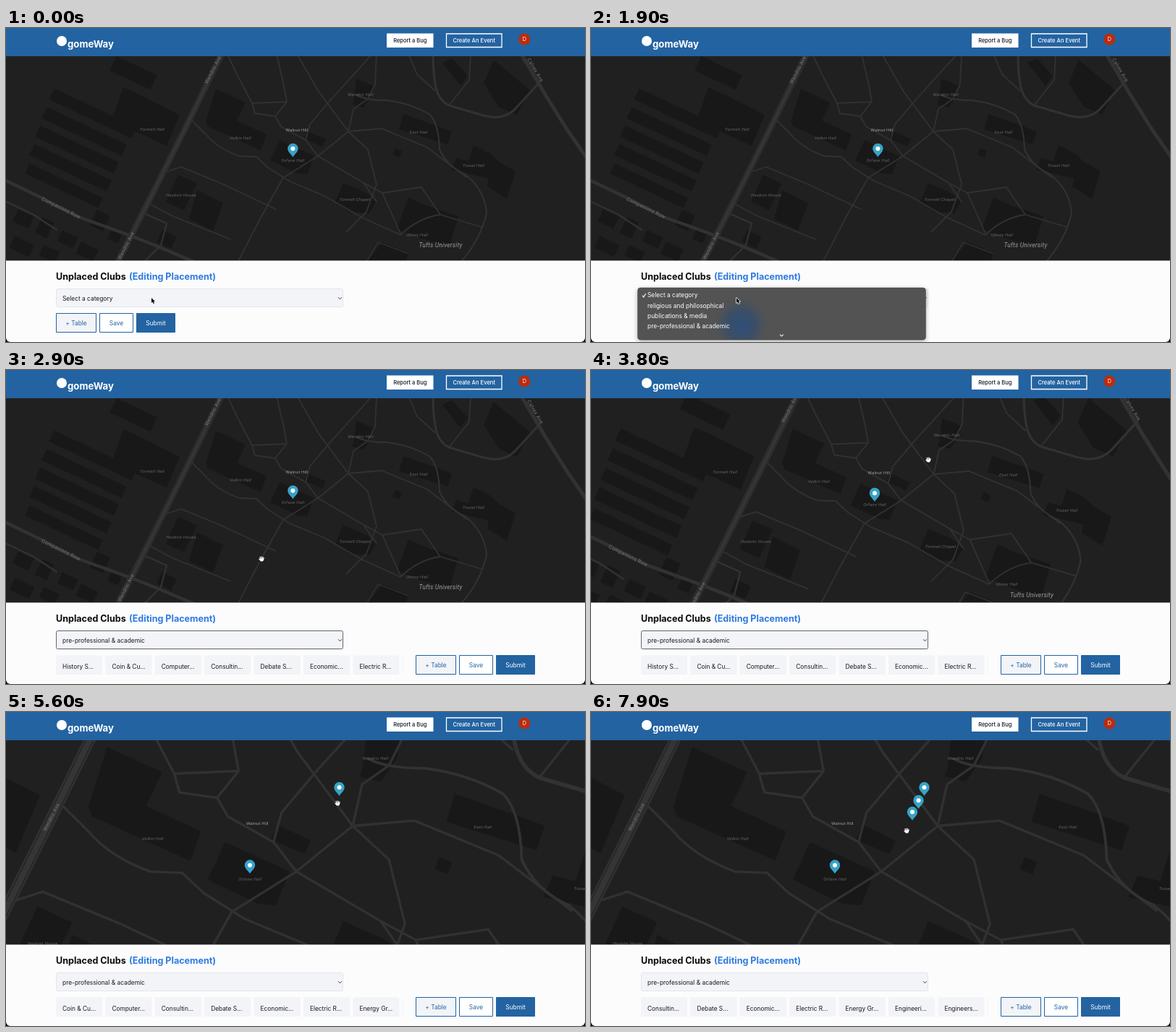
An HTML page with a canvas for the animation above (8000 ms loop, 800 by 434 pixels).

```html
<!DOCTYPE html>
<html lang="en">
<head>
<meta charset="utf-8">
<title>Club placement map</title>
<style>
html, body { margin: 0; width: 100%; height: 100%; overflow: hidden; background: #000; }
canvas { display: block; width: 800px; height: 434px; }
</style>
</head>
<body>
<canvas id="stage" width="800" height="434"></canvas>
<script>
const ctx = document.getElementById('stage').getContext('2d');
const LOOP = 8000, STEP = 100;
const BLUE = '#2363a1', PANEL = '#f2f4f8', TAU = Math.PI * 2;
const UI = 'Inter, sans-serif', MAP = 'Roboto, sans-serif';

const zoom = { x: 466, y: 126, from: 3700, to: 4700, max: 1.854 };
const menu = { open: 500, hover: 900, leave: 1500, close: 2300 };
const drops = [{ t: 5500, x: 460.5, y: 116 }, { t: 6600, x: 452.5, y: 134 }, { t: 7700, x: 444, y: 150 }];

// Cursor stops: time, x, y
const stops = [
  [0, 201, 373], [2300, 201, 373], [2900, 353, 261], [3500, 466, 124], [4700, 466, 124],
  [5000, 100, 408], [5100, 100, 408], [5500, 459, 124], [5600, 458, 126], [5700, 458, 126],
  [6050, 100, 408], [6200, 100, 408], [6600, 451, 141], [6750, 451, 141],
  [7100, 100, 408], [7300, 100, 408], [7700, 442, 157], [7900, 436, 164], [8000, 436, 164]
];

const options = ['Select a category', 'religious and philosophical', 'publications & media', 'pre-professional & academic'];
const clubs = ['History S...', 'Coin & Cu...', 'Computer...', 'Consultin...', 'Debate S...', 'Economic...',
  'Electric R...', 'Energy Gr...', 'Engineeri...', 'Engineers...', 'Finance S...'];

// Map geometry, in pixels at zoom 1
const mainRoad = 'M298 36L249 136L200 234L153 326';
const roads = [
  [4.5, 'M-4 209L50 235L100 261L172 287L205 300L262 324'],
  [5, 'M712 36L745 92L775 140L804 182'],
  [3, 'M590 36Q590 64 594 82Q598 100 612 107L660 121Q690 129 707 108L738 74'],
  [2.2, 'M-4 238L38 258L70 279M186 254L222 270L214 300L190 324'],
  [2, 'M485 93Q498 100 527 100Q559 104 585 119Q598 132 599 168Q610 192 634 202Q662 224 664 256Q656 292 628 324']
];
const walks = [
  'M257 128L276 147Q292 166 322 177L346 178L362 193L392 212L440 232L492 262L545 286',
  'M306 36L318 62L340 104L388 102L384 80L374 36M340 104L344 118L372 122L388 102',
  'M372 122L380 136L414 155L431 177L473 143L480 112L500 98L510 78L512 36',
  'M414 155L420 133L447 101L506 36M473 143L432 88L402 36M473 143L519 139L582 165',
  'M431 177L383 207L352 262L320 324M431 177L494 214L520 228L545 284',
  'M473 143L500 168L512 216L498 254L470 282M512 240L494 214',
  'M582 165L599 178L636 206M592 86L568 64L556 36M612 107L640 72L642 36',
  'M545 286Q570 262 600 258L657 275M520 228L574 220L600 258',
  'M214 201L242 192L300 216L372 250M193 240L230 260L310 292'
];
const halls = [
  'M290 84L331 103L319 128L360 147L352 169L279 136L276 129Z',
  'M378 155L426 177L416 202L402 201L365 183Z',
  'M417 142L442 154L437 164L412 153Z',
  'M480 101L484 70L508 80L506 93L494 110L478 106Z',
  'M549 119L592 134L616 143L610 161L543 140Z',
  'M538 166L547 170L544 179L534 175Z',
  'M646 162L670 174L681 185L704 198L692 236L665 219L667 208L615 196L622 180L639 184Z',
  'M466 214L500 229L511 240L502 256L474 254L455 240Z',
  'M556 234L580 245L625 260L613 301L577 292L540 278Z',
  'M162 82L187 93L240 120L222 163L190 148L145 130Z',
  'M238 203L264 215L246 252L221 240Z',
  'M264 224L300 242L286 280L253 264Z',
  'M674 44L724 86L706 120L681 109L660 76Z',
  'M603 48L616 42L638 66L628 80Z',
  'M520 296L556 311L552 324L498 324Z'
];
// Rectangles sharing one tilt: centre x, y, width, height
const blocks = [
  [120, 118, 126, 17], [108, 143, 122, 17], [98, 168, 120, 17], [89, 193, 118, 17], [80, 218, 112, 15],
  [176, 62, 62, 22], [24, 264, 24, 18], [53, 276, 18, 24], [85, 292, 24, 17], [130, 266, 20, 24],
  [22, 302, 30, 18], [60, 312, 24, 16], [112, 309, 26, 18], [150, 288, 16, 14], [222, 292, 22, 18]
];
const labels = [
  ['Wendric Hall', 490, 92.5], ['Tormell Hall', 202, 140.5], ['Velkin Hall', 324, 152.5], ['East Hall', 570, 144],
  ['Orfane Hall', 396.5, 183], ['Trusel Hall', 646, 190], ['Hasbrin House', 242, 231],
  ['Tormell Chapel', 482, 237], ['Ulmey Hall', 568, 286]
];
const streets = [
  ['Wendric Ave', 286, 58, -63, 1, 1.3], ['Wendric Ave', 166, 301, -63, 1, 1.3], ['Wendric Ave', 248.6, 136.5, -63, 1.7, 2],
  ['Companions Row', 76, 249, 26, 1, 1.3], ['Calvex Ave', 731, 58, 59, 1, 1.3]
];

const clamp = v => Math.max(0, Math.min(1, v));
const mix = (a, b, p) => a + (b - a) * p;

function text(str, x, y, size, color, { weight = 400, family = UI, align = 'left', style = 'normal', gap = 0 } = {}) {
  ctx.font = `${style} ${weight} ${size}px ${family}`;
  ctx.textAlign = align;
  ctx.letterSpacing = gap + 'px';
  ctx.fillStyle = color;
  ctx.fillText(str, x, y);
  ctx.letterSpacing = '0px';
}

function box(x, y, w, h, fill, edge, r = 0, line = 1) {
  ctx.beginPath();
  ctx.roundRect(x, y, w, h, r);
  if (fill) { ctx.fillStyle = fill; ctx.fill(); }
  if (edge) { ctx.strokeStyle = edge; ctx.lineWidth = line; ctx.stroke(); }
}

function trace(d, width, color) {
  ctx.lineWidth = width;
  ctx.strokeStyle = color;
  ctx.stroke(new Path2D(d));
}

function disc(x, y, r, color) {
  ctx.beginPath();
  ctx.arc(x, y, r, 0, TAU);
  ctx.fillStyle = color;
  ctx.fill();
}

function pin(x, y) {
  ctx.save();
  ctx.translate(x, y);
  ctx.fillStyle = '#36a3c7';
  ctx.fill(new Path2D('M0 0C-2 -4 -7.2 -7 -7.2 -12A7.2 7.2 0 0 1 7.2 -12C7.2 -7 2 -4 0 0Z'));
  disc(0, -11.8, 3, '#fff');
  ctx.restore();
}

function drawMap(t) {
  const s = Math.pow(zoom.max, clamp((t - zoom.from) / (zoom.to - zoom.from)));
  const at = (x, y) => [zoom.x + (x - zoom.x) * s, zoom.y + (y - zoom.y) * s];
  ctx.save();
  ctx.beginPath();
  ctx.rect(0, 39, 800, 283);
  ctx.clip();
  ctx.fillStyle = '#202020';
  ctx.fillRect(0, 39, 800, 283);

  ctx.save();
  ctx.translate(...at(0, 0));
  ctx.scale(s, s);
  ctx.lineJoin = ctx.lineCap = 'round';
  ctx.fillStyle = '#181818';
  halls.forEach(d => ctx.fill(new Path2D(d)));
  for (const [x, y, w, h] of blocks) {
    ctx.save();
    ctx.translate(x, y);
    ctx.rotate(0.44);
    ctx.fillRect(-w / 2, -h / 2, w, h);
    ctx.restore();
  }
  walks.forEach(d => trace(d, 1.8, '#313131'));
  roads.forEach(([w, d]) => trace(d, w, '#323232'));
  trace(mainRoad, 8.5, '#303030');
  trace(mainRoad, 5.6, '#232323');
  trace(mainRoad, 4.4, '#353535');
  trace('M498 324L514 296L556 312', 1, '#3a3a3a');
  ctx.restore();

  ctx.textBaseline = 'middle';
  for (const [name, x, y] of labels)
    text(name, ...at(x, y), 6.1, '#656565', { family: MAP, align: 'center', style: 'italic', gap: 0.2 });
  text('Walnut Hill', ...at(402, 141.3), 6, '#a2a2a2', { family: MAP, align: 'center', gap: 0.2 });
  text('Tufts University', ...at(600.5, 300), 8.5, '#9a9a9a', { family: MAP, align: 'center', style: 'italic', gap: 0.2 });
  for (const [name, x, y, deg, min, max] of streets) {
    if (s < min || s > max) continue;
    ctx.save();
    ctx.translate(...at(x, y));
    ctx.rotate(deg * Math.PI / 180);
    text(name, 0, 0, 7, '#777', { family: MAP, align: 'center', gap: 0.3 });
    ctx.restore();
  }
  ctx.textBaseline = 'alphabetic';
  pin(...at(396.4, 178.6));
  drops.forEach(d => t >= d.t && pin(d.x, d.y));
  ctx.restore();
}

function drawHeader() {
  ctx.fillStyle = BLUE;
  ctx.fillRect(0, 0, 800, 39);
  disc(77, 18, 7, '#fff');
  text('gomeWay', 85, 26.5, 13.2, '#fff', { weight: 700 });
  box(526, 7.5, 64.5, 19.5, '#fff');
  text('Report a Bug', 558.3, 20, 7.5, '#111827', { weight: 500, align: 'center' });
  box(608.5, 8, 76.5, 18.5, null, '#fff', 0, 1.3);
  text('Create An Event', 646.7, 20, 7.6, '#fff', { weight: 500, align: 'center' });
  disc(716.3, 15.6, 8, '#ba2c0d');
  text('D', 716.3, 18.2, 7.2, '#fff', { align: 'center' });
}

function button(label, x, w, fill, color) {
  box(x + .5, 394.5, w - 1, 26, fill, BLUE);
  text(label, x + w / 2, 411.2, 8.4, color, { align: 'center' });
}

function drawPanel(t) {
  const chosen = t >= menu.close;
  const focused = chosen && t < 5100;
  ctx.fillStyle = '#fcfcfd';
  ctx.fillRect(0, 321.5, 800, 113);
  text('Unplaced Clubs', 69, 348, 12.55, '#0b0b0d', { weight: 700 });
  text('(Editing Placement)', 170, 348, 12.55, '#2e7be0', { weight: 700 });
  box(69.5, 360.5, 396, 25, PANEL, focused ? '#62656c' : '#e3e5ea', 2);
  text(options[chosen ? 3 : 0], 78, 376.7, 8.4, '#16181d');
  trace('M459 372.3L461.4 374.7L463.8 372.3', 1, '#333');

  if (chosen) {
    const first = drops.filter(d => t >= d.t).length;
    ctx.save();
    ctx.beginPath();
    ctx.rect(69, 390, 480, 40);
    ctx.clip();
    for (let i = 0; i < 8; i++) {
      const x = 69 + i * 68.4;
      box(x, 394.5, 64, 26.5, PANEL, null, 1);
      text(clubs[first + i], x + 9, 413, 8.3, '#16181d');
    }
    ctx.restore();
  }
  const [a, b, c] = chosen ? [566, 626, 677] : [69, 129, 180];
  button('+ Table', a, 56, PANEL, BLUE);
  button('Save', b, 47, '#fff', BLUE);
  button('Submit', c, 54, BLUE, '#fff');
}

function drawMenu(t) {
  if (t < menu.open || t >= menu.close) return;
  const top = t < menu.leave ? 364.5 : 359;
  ctx.save();
  ctx.shadowColor = 'rgba(0,0,0,.35)';
  ctx.shadowBlur = 6;
  ctx.shadowOffsetY = 2;
  box(64.5, top, 398, 431 - top, '#535353', null, 4);
  ctx.restore();

  ctx.save();
  ctx.beginPath();
  ctx.roundRect(64.5, top, 398, 431 - top, 4);
  ctx.clip();
  const glow = ctx.createRadialGradient(207, 410, 4, 207, 410, 42);
  glow.addColorStop(0, 'rgba(44,78,121,.9)');
  glow.addColorStop(.45, 'rgba(48,76,112,.65)');
  glow.addColorStop(1, 'rgba(83,83,83,0)');
  ctx.fillStyle = glow;
  ctx.fillRect(160, 360, 100, 74);
  ctx.restore();

  ctx.save();
  ctx.beginPath();
  ctx.rect(64, top, 399, 419 - top);
  ctx.clip();
  if (t >= menu.hover && t < menu.leave) box(67.5, top + 31.5, 392.5, 14, '#4a8ee9', null, 2);
  options.forEach((o, i) => text(o, 78, top + 13.3 + i * 14.2, 8.4, '#fff'));
  trace(`M71 ${top + 10.6}l1.7 2.4l3 -5`, 1.1, '#fff');
  ctx.restore();
  trace('M261 423.6L263.4 426L265.8 423.6', 1.1, '#eee');
  box(64.5, top, 398, 431 - top, null, 'rgba(60,60,60,.6)', 4, .7);
}

function drawCursor(t) {
  const i = Math.max(1, stops.findIndex(k => k[0] > t));
  const [t0, x0, y0] = stops[i - 1], [t1, x1, y1] = stops[i];
  let p = clamp((t - t0) / (t1 - t0));
  p = p * p * (3 - 2 * p);
  const x = mix(x0, x1, p), y = mix(y0, y1, p);
  ctx.save();
  ctx.translate(x, y);
  ctx.lineJoin = ctx.lineCap = 'round';
  if (y > 39 && y < 321) {
    const hand = 'M-1.8 2L-3.2 .2M-1.6 0L-2 -2.6M0 0L0 -3.2M1.6 0L1.9 -2.7M2.6 1L3.2 -1.2';
    const palm = 'M-1.6 0L2.6 0L2 3L-.8 3Z';
    trace(hand, 2.4, '#111');
    trace(palm, 2.4, '#111');
    trace(hand, 1.2, '#fff');
    trace(palm, 1, '#fff');
    ctx.fillStyle = '#fff';
    ctx.fill(new Path2D(palm));
  } else {
    const arrow = 'M0 0L0 7L1.6 5.6L2.8 8.2L4 7.6L2.9 5.2L5 5Z';
    trace(arrow, 1.4, '#fff');
    ctx.fillStyle = '#000';
    ctx.fill(new Path2D(arrow));
  }
  ctx.restore();
}

function render(t) {
  ctx.fillStyle = '#000';
  ctx.fillRect(0, 0, 800, 434);
  ctx.save();
  ctx.beginPath();
  ctx.roundRect(0, 0, 800, 434, [0, 0, 6, 6]);
  ctx.clip();
  drawMap(t);
  drawHeader();
  drawPanel(t);
  drawMenu(t);
  drawCursor(t);
  ctx.restore();
}

const start = performance.now();
function tick() {
  const t = (performance.now() - start) % LOOP;
  render(Math.floor(t / STEP) * STEP);
  requestAnimationFrame(tick);
}
tick();
</script>
</body>
</html>
```
